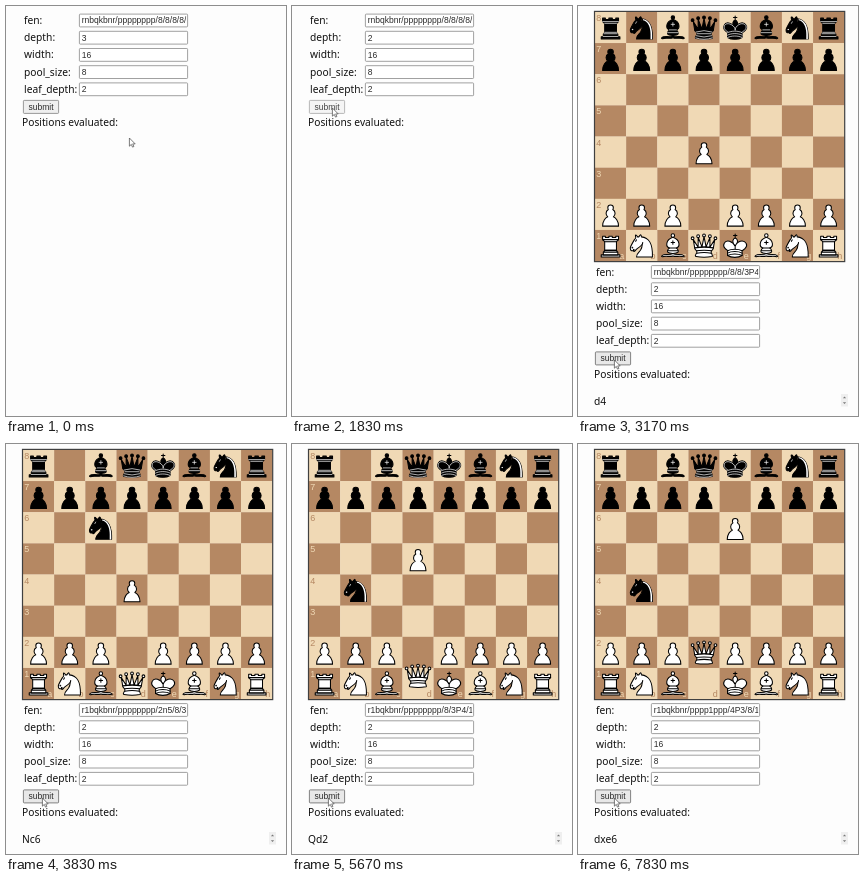
Write an HTML page with a canvas that moves like this. It is 280 px wide and 410 px high and loops after 8 s.

```html
<!DOCTYPE html>
<html lang="en">
<head>
<meta charset="utf-8">
<title>Chess engine form</title>
<style>
html, body { margin: 0; width: 100%; height: 100%; overflow: hidden; background: #fdfdfd; }
canvas { display: block; width: 280px; height: 410px; }
</style>
</head>
<body>
<canvas id="stage"></canvas>
<script>
const W = 280, H = 410, LOOP = 8000, TICK = 1000 / 6;
const canvas = document.getElementById('stage');
const ctx = canvas.getContext('2d');
const ratio = window.devicePixelRatio || 1;
canvas.width = W * ratio;
canvas.height = H * ratio;

const LABEL_FONT = '10.24px "Noto Sans", sans-serif';
const FIELD_FONT = '8.53px "Liberation Sans", Arial, sans-serif';
const NOTE_FONT = '9px "Liberation Sans", Arial, sans-serif';
const PAPER = '#fdfdfd', INK = '#111', FIELD_INK = '#2a2a2a';
const LIGHT = '#f0d9b5', DARK = '#b58863';
const BOARD = { x: 17, y: 5.9, cell: 31.15, shift: 251.5, shown: 1990 };
const MOVE_TIME = 200, PRESS_TIME = 160;

// Piece outlines on a 45-unit square: body, detail lines, and lines for the dark set.
const disc = (x, y, r) => `M${x + r} ${y}a${r} ${r} 0 1 1 ${-2 * r} 0a${r} ${r} 0 1 1 ${2 * r} 0z`;
const ROOK_TOP = 'M11 14V9H15V11H20V9H25V11H30V9H34V14';
const KING_ARCS = 'M11.5 30C17 27 27 27 32.5 30M11.5 33.5C17 30.5 27 30.5 32.5 33.5M11.5 37C17 34 27 34 32.5 37';
const SHAPES = {
  p: {
    body: ['M22.5 9c-2.21 0-4 1.79-4 4 0 .89.29 1.71.78 2.38C17.33 16.5 16 18.59 16 21c0 2.03.94 3.84 2.41 5.03C15.41 27.09 11 31.58 11 39.5H34C34 31.58 29.59 27.09 26.59 26.03 28.06 24.84 29 23.03 29 21 29 18.59 27.67 16.5 25.72 15.38 26.21 14.71 26.5 13.89 26.5 13c0-2.21-1.79-4-4-4z']
  },
  r: {
    body: ['M9 39H36V36H9z', 'M12 36V32H33V36z', 'M14 29.5V16.5H31V29.5z', 'M12.5 32L14 29.5H31L32.5 32z', ROOK_TOP + 'L31 17H14z'],
    lines: 'M11 14H34',
    inverse: 'M12 35.5H33M13 31.5H32M14 29.5H31M14 16.5H31M11 14H34'
  },
  n: {
    body: ['M22 10C32.5 11 38.5 18 38 39H15C15 30 25 32.5 23 18',
      'M24 18C24.38 20.91 18.45 25.37 16 27C13 29 13.18 31.34 11 31C9.96 30.06 12.41 27.96 11 28C10 28 11.19 29.23 10 30C9 30 6 31 6 26C6 24 12 14 12 14C12 14 13.89 12.1 14 10.5C13.27 9.5 13.5 8.5 13.5 7.5C14.5 6.5 16.5 10 16.5 10H18.5C18.5 10 19.28 8 21 7C22 7 22 10 22 10'],
    lines: disc(9, 25.5, .5) + 'M15 14.3L13.8 16.5',
    inverse: disc(9, 25.5, .5) + 'M15 14.3L13.8 16.5',
    mane: 'M24.55 10.4L24.1 11.85L24.6 12C27.75 13 30.25 14.49 32.5 18.75C34.75 23 35.75 29 35.25 39L35.2 39.5H37.45L37.5 39C38 28.94 36.62 22.15 34.25 17.66C31.88 13.17 28.46 11 25 10.5z'
  },
  b: {
    body: ['M9 36C12.39 35 19.1 36.43 22.5 34C25.9 36.43 32.6 35 36 36C36 36 37.65 36.54 39 38C38.3 39 37.35 39 36 38.5C32.6 37.5 25.9 39 22.5 37.5C19.1 39 12.4 37.5 9 38.5C7.65 39 6.7 39 6 38C7.35 36.54 9 36 9 36z',
      'M15 32C17.5 34.5 27.5 34.5 30 32C30.5 30.5 30 30 30 30C30 27.5 27.5 26 27.5 26C33 24.5 33.5 14.5 22.5 10.5C11.5 14.5 12 24.5 17.5 26C17.5 26 15 27.5 15 30C15 30 14.5 30.5 15 32z',
      disc(22.5, 8, 2.5)],
    lines: 'M17.5 26H27.5M15 30H30M22.5 15.5V20.5M20 18H25',
    inverse: 'M17.5 26H27.5M15 30H30M22.5 15.5V20.5M20 18H25'
  },
  q: {
    body: ['M9 26C17.5 24.5 30 24.5 36 26L38 14L31 25V11L25.5 24.5L22.5 9.5L19.5 24.5L14 10.5V25L7 14z',
      'M9 26C9 28 10.5 28 11.5 30C12.5 31.5 12.5 31 12 33.5C10.5 34.5 10.5 36 10.5 36C9 37.5 11 38.5 11 38.5C17.5 39.5 27.5 39.5 34 38.5C34 38.5 35.5 37.5 34 36C34 36 34.5 34.5 33 33.5C32.5 31 32.5 31.5 33.5 30C34.5 28 36 28 36 26C27.5 24.5 17.5 24.5 9 26z',
      disc(6, 12, 2), disc(14, 9, 2), disc(22.5, 8, 2), disc(31, 9, 2), disc(39, 12, 2)],
    lines: 'M11.5 30C15 29 30 29 33.5 30M12 33.5C18 32.5 27 32.5 33 33.5',
    inverse: 'M11 29A35 35 0 0 1 34 29M12.5 31.5H32.5M11.5 34.5A35 35 0 0 0 33.5 34.5M10.5 37.5A35 35 0 0 0 34.5 37.5'
  },
  k: {
    body: ['M22.5 25C22.5 25 27 17.5 25.5 14.5C25.5 14.5 24.5 12 22.5 12C20.5 12 19.5 14.5 19.5 14.5C18 17.5 22.5 25 22.5 25',
      'M11.5 37C17 40.5 27 40.5 32.5 37V30C32.5 30 41.5 25.5 38.5 19.5C34.5 13 25 16 22.5 23.5V27V23.5C19 16 9.5 13 6.5 19.5C3.5 25.5 11.5 29.5 11.5 29.5z'],
    lines: KING_ARCS,
    cross: 'M22.5 11.63V6M20 8H25',
    inverse: 'M32 29.5C32 29.5 40.5 25.5 38 19.85C34.15 14 25 18 22.5 24.5V26.6V24.5C20 18 9.9 14 7 19.85C4.5 25.5 11.85 28.85 11.85 28.85' + KING_ARCS
  }
};
for (const shape of Object.values(SHAPES)) {
  shape.body = shape.body.map(d => new Path2D(d));
  for (const key of ['lines', 'inverse', 'mane', 'cross'])
    if (shape[key]) shape[key] = new Path2D(shape[key]);
}
const ARROW = new Path2D('M0 0V8.2L1.9 6.4L3.1 9.1L4.5 8.5L3.3 5.9H5.8z');

const MOVES = [
  { at: 2100, from: 'd2', to: 'd4', name: 'd4' },
  { at: 3600, from: 'b8', to: 'c6', name: 'Nc6' },
  { at: 4267, from: 'd4', to: 'd5', name: 'd5' },
  { at: 5100, from: 'c6', to: 'b4', name: 'Nb4' },
  { at: 5600, from: 'd1', to: 'd2', name: 'Qd2' },
  { at: 6433, from: 'e7', to: 'e5', name: 'e5' },
  { at: 7100, from: 'd5', to: 'e6', name: 'dxe6', takes: 'e5' }
];
const PRESSES = [1825, 3325, 4825, 5490, 6160, 6825, 7660];
const BUTTON = {
  idle: ['#efefef', '#808080', FIELD_INK],
  hover: ['#e8e8e8', '#666', FIELD_INK],
  pressed: ['#f5f5f5', '#a8a8a8', '#444']
};
const POINTER = [
  [0, 123.4, 132], [60, 123.4, 132], [480, 177, 32], [720, 177, 32], [1150, 40.4, 102],
  [1830, 40.4, 102], [2000, 42.2, 104], [2330, 46, 114], [3000, 36.4, 354], [LOOP, 36.4, 354]
];

const swing = p => .5 - .5 * Math.cos(Math.PI * p);

function pointerAt(t) {
  const i = Math.max(1, POINTER.findIndex(k => k[0] > t));
  const [t0, x0, y0] = POINTER[i - 1], [t1, x1, y1] = POINTER[i];
  const p = swing((t - t0) / (t1 - t0));
  return { x: x0 + (x1 - x0) * p, y: y0 + (y1 - y0) * p };
}

function startPosition() {
  const pieces = {};
  [...'rnbqkbnr'].forEach((kind, i) => {
    const file = 'abcdefgh'[i];
    pieces[file + 8] = kind;
    pieces[file + 7] = 'p';
    pieces[file + 2] = 'P';
    pieces[file + 1] = kind.toUpperCase();
  });
  return pieces;
}

function gameAt(t) {
  const game = { pieces: startPosition(), name: '', active: null };
  for (const move of MOVES.filter(m => m.at <= t)) {
    const { pieces } = game, kind = pieces[move.from];
    const progress = Math.min(1, (t - move.at) / MOVE_TIME);
    const taken = pieces[move.takes];
    delete pieces[move.from];
    delete pieces[move.takes];
    pieces[move.to] = kind;
    game.name = move.name;
    game.active = progress < 1 ? { ...move, kind, taken, progress: swing(progress) } : null;
  }
  return game;
}

function fenOf(pieces) {
  return [8, 7, 6, 5, 4, 3, 2, 1].map(rank =>
    [...'abcdefgh'].map(file => pieces[file + rank] || '1').join('')
      .replace(/1+/g, gap => gap.length)).join('/');
}

function cellOf(square) {
  return {
    x: BOARD.x + 'abcdefgh'.indexOf(square[0]) * BOARD.cell,
    y: BOARD.y + (8 - square[1]) * BOARD.cell
  };
}

function text(str, x, y, font, color = INK, align = 'left') {
  ctx.font = font;
  ctx.fillStyle = color;
  ctx.textAlign = align;
  ctx.fillText(str, x, y);
}

function box(x, y, w, h, fill, stroke, line = .8) {
  ctx.beginPath();
  ctx.roundRect(x, y, w, h, .8);
  ctx.fillStyle = fill;
  ctx.fill();
  ctx.strokeStyle = stroke;
  ctx.lineWidth = line;
  ctx.stroke();
}

function drawPiece(kind, { x, y }, alpha = 1) {
  const shape = SHAPES[kind.toLowerCase()], dark = kind === kind.toLowerCase();
  ctx.save();
  ctx.translate(x, y);
  ctx.scale(BOARD.cell / 45, BOARD.cell / 45);
  ctx.globalAlpha = alpha;
  ctx.lineWidth = 1.5;
  ctx.lineCap = ctx.lineJoin = 'round';
  ctx.strokeStyle = '#000';
  ctx.fillStyle = dark ? '#000' : '#fff';
  if (shape.cross) ctx.stroke(shape.cross);
  for (const path of shape.body) {
    ctx.fill(path);
    ctx.stroke(path);
  }
  if (dark) {
    ctx.strokeStyle = ctx.fillStyle = '#fff';
    ctx.lineWidth = 1;
    if (shape.mane) ctx.fill(shape.mane);
  }
  const detail = dark ? shape.inverse : shape.lines;
  if (detail) ctx.stroke(detail);
  ctx.restore();
}

function drawBoard({ pieces, active }) {
  const { x, y, cell } = BOARD, size = cell * 8;
  for (let row = 0; row < 8; row++) {
    for (let col = 0; col < 8; col++) {
      const pale = (row + col) % 2 === 0, left = x + col * cell, top = y + row * cell;
      ctx.fillStyle = pale ? LIGHT : DARK;
      ctx.fillRect(left, top, cell + .2, cell + .2);
      const ink = pale ? DARK : LIGHT;
      if (col === 0) text(8 - row, left + 1.2, top + 9, NOTE_FONT, ink);
      if (row === 7) text('abcdefgh'[col], left + cell - 1.9, top + cell - 2.6, NOTE_FONT, ink, 'right');
    }
  }
  ctx.strokeStyle = '#404040';
  ctx.lineWidth = 1.2;
  ctx.strokeRect(x - .5, y - .5, size + 1, size + 1);

  for (const [square, kind] of Object.entries(pieces))
    if (!active || square !== active.to) drawPiece(kind, cellOf(square));
  if (active) {
    const a = cellOf(active.from), b = cellOf(active.to), p = active.progress;
    if (active.taken) drawPiece(active.taken, cellOf(active.takes), 1 - p);
    drawPiece(active.kind, { x: a.x + (b.x - a.x) * p, y: a.y + (b.y - a.y) * p });
  }
}

function triangle(x, y, dir, size, color) {
  ctx.beginPath();
  ctx.moveTo(x - size, y + size * .5 * dir);
  ctx.lineTo(x + size, y + size * .5 * dir);
  ctx.lineTo(x, y - size * .6 * dir);
  ctx.fillStyle = color;
  ctx.fill();
}

function stepper(x, y, w, h) {
  ctx.fillStyle = '#efefef';
  ctx.fillRect(x, y, w, h);
  triangle(x + w / 2, y + h * .27, 1, 1.6, '#777');
  triangle(x + w / 2, y + h * .73, -1, 1.6, '#777');
}

function drawForm(t, fen, pointer, offset) {
  const fields = [['fen', fen], ['depth', t < 640 ? 3 : 2], ['width', 16], ['pool_size', 8], ['leaf_depth', 2]];
  const inside = (x, y, w, h) => pointer.x >= x && pointer.x <= x + w && pointer.y >= y && pointer.y <= y + h;

  fields.forEach(([label, value], i) => {
    const y = offset + 8.1 + i * 17.2;
    const focused = i === 1 && t > 600 && t < PRESSES[0];
    text(label + ':', 18, y + 9.9, LABEL_FONT);
    box(73.4, y, 108.2, 12.8, '#fff', focused ? '#222' : '#8a8a8a', focused ? 1.2 : .8);
    ctx.save();
    ctx.beginPath();
    ctx.rect(75, y, 105.2, 13);
    ctx.clip();
    text(value, 75.7, y + 9.2, FIELD_FONT, FIELD_INK);
    ctx.restore();
    if (i > 0 && inside(73, y, 109, 13)) stepper(171, y + 1.4, 9, 10);
  });

  const top = offset + 94.4;
  const pressed = PRESSES.some(p => t >= p && t < p + PRESS_TIME);
  const hover = inside(17, top, 36, 13.4);
  const [fill, edge, ink] = BUTTON[pressed ? 'pressed' : hover ? 'hover' : 'idle'];
  box(17.4, top, 35.2, 13, fill, edge);
  text('submit', 35, top + 9.1, FIELD_FONT, ink, 'center');
  text('Positions evaluated:', 16, offset + 120, LABEL_FONT);
}

function draw(t) {
  ctx.setTransform(ratio, 0, 0, ratio, 0, 0);
  ctx.fillStyle = PAPER;
  ctx.fillRect(0, 0, W, H);

  const game = gameAt(t), pointer = pointerAt(t), started = t >= BOARD.shown;
  if (started) drawBoard(game);
  drawForm(t, fenOf(game.pieces), pointer, started ? BOARD.shift : 0);
  if (game.name) {
    text(game.name, 16, 398.6, LABEL_FONT);
    stepper(263, 388, 7, 12.5);
  }

  ctx.save();
  ctx.translate(pointer.x, pointer.y);
  ctx.fillStyle = '#fff';
  ctx.strokeStyle = '#444';
  ctx.lineWidth = .7;
  ctx.fill(ARROW);
  ctx.stroke(ARROW);
  ctx.restore();
}

function loop() {
  const t = performance.now() % LOOP;
  draw(Math.floor((t + 4) / TICK) * TICK % LOOP);
  requestAnimationFrame(loop);
}
loop();
</script>
</body>
</html>
```
